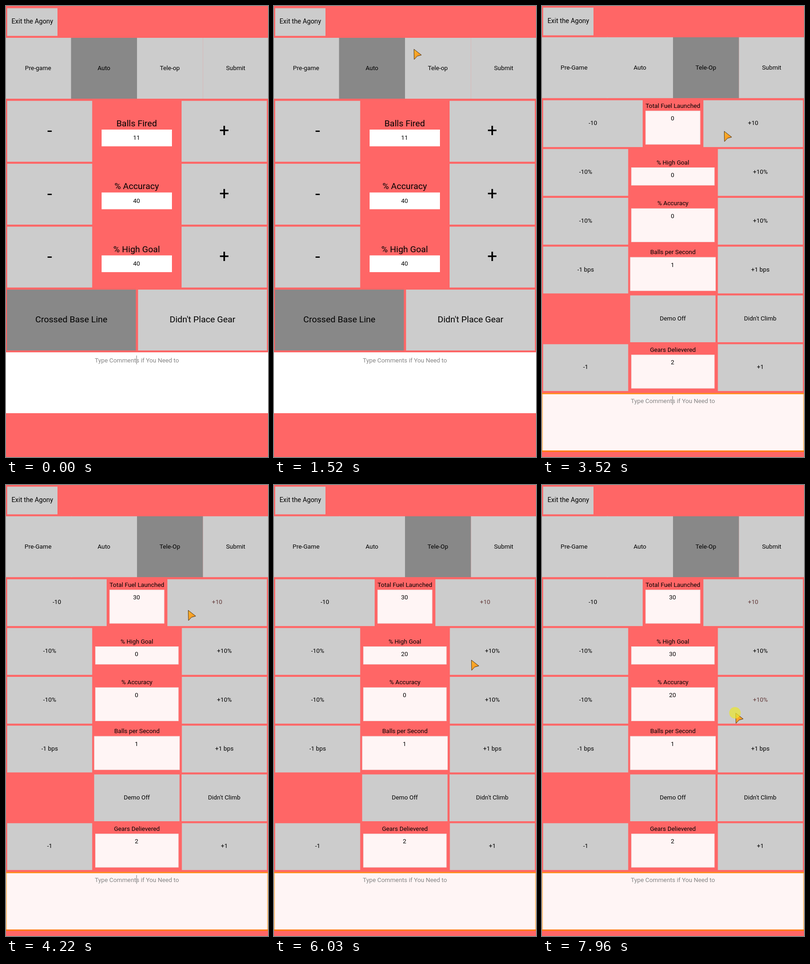
An HTML page for the animation above (7990 ms loop, 570 by 978 pixels).

```html
<!DOCTYPE html>
<html lang="en">
<head>
<meta charset="utf-8">
<title>Match form</title>
<style>
html, body { margin: 0; width: 100%; height: 100%; overflow: hidden; background: #ff6666; }
svg { display: block; width: 570px; height: 978px; font-family: Roboto, sans-serif; }
text { text-anchor: middle; white-space: pre; }
</style>
</head>
<body>
<svg id="stage" viewBox="0 0 570 978"></svg>
<script>
const LOOP = 7990, SWITCH = 1960, FOCUS = 2090, ENTER = 450, TAB_CLICK = 1640;
const RED = '#ff6666', GREY = '#cccccc', DARK = '#888888', PRESSED = '#f18282', PALE = '#fff5f5';
const SMALL = 13.3, MEDIUM = 14.25, LARGE = 19, HUGE = 38;
const stage = document.getElementById('stage');

function add(parent, tag, attrs = {}) {
  const el = document.createElementNS('http://www.w3.org/2000/svg', tag);
  for (const key in attrs) el.setAttribute(key, attrs[key]);
  return parent.appendChild(el);
}
function box(parent, x, y, width, height, fill, more) {
  return add(parent, 'rect', { x, y, width, height, fill, ...more });
}
function label(parent, str, x, y, size = SMALL, fill = '#000') {
  const el = add(parent, 'text', { x, y, 'font-size': size, fill });
  el.textContent = str;
  return el;
}
function button(parent, str, x, y, w, h, size = SMALL, fill = GREY) {
  const rect = box(parent, x, y, w, h, fill);
  const text = label(parent, str, x + w / 2, y + h / 2 + size * 0.342 - 1.2, size);
  return { rect, text };
}
function header(parent, top, names, active) {
  button(parent, 'Exit the Agony', 2.5, top - 64.2, 109.5, 60, MEDIUM);
  return names.map((name, i) => {
    const x = i && i * 143.5 - 2;
    const rect = box(parent, x, top, 143.6, 132, i === active ? DARK : GREY);
    label(parent, name, 69.8 + i * 143.3, top + 69.8);
    return rect;
  });
}
function input(parent, half, y, h, value) {
  const x = 284.8 - half;
  box(parent, x, y, 2 * half, h, PALE);
  box(parent, x + 0.5, y + 0.5, 2 * half - 1, h - 1, 'none', { stroke: '#efdede' });
  return label(parent, value, 284, y + 20.8);
}
function comments(parent, baseline) {
  label(parent, 'Type Comments if You Need to', 284.8, baseline, SMALL, '#858585');
  return box(parent, 283.4, baseline - 15, 1.4, 19, '#999');
}

box(stage, 0, 0, 570, 978, RED);

// Auto screen
const auto = add(stage, 'g');
const teleTab = header(auto, 69, ['Pre-game', 'Auto', 'Tele-op', 'Submit'], 1)[2];
[['Balls Fired', 11], ['% Accuracy', 40], ['% High Goal', 40]].forEach(([name, value], i) => {
  const y = 205.7 + i * 136.4;
  button(auto, '-', 2.5, y, 185, 132, HUGE);
  button(auto, '+', 382, y, 185.5, 132, HUGE);
  label(auto, name, 284.3, y + 55, LARGE);
  box(auto, 208, y + 62.3, 153, 36.3, '#fff');
  label(auto, value, 284, y + 84.5);
});
button(auto, 'Crossed Base Line', 2, 615, 280.5, 132, LARGE, DARK);
button(auto, "Didn't Place Gear", 287.3, 615, 280.4, 132, LARGE);
box(auto, 0, 751, 570, 132, '#fff');
const autoCaret = comments(auto, 773);

// Tele-op screen: rows sit in equal slots; start and gap time the three presses of "+"
const tele = add(stage, 'g');
header(tele, 67.8, ['Pre-Game', 'Auto', 'Tele-Op', 'Submit'], 2);
const slotY = slot => 204.4 + slot * 105.8;
const rows = [
  { name: 'Total Fuel Launched', step: '10', value: 0, slot: 0, side: 216.5, half: 59.5, start: 3380, gap: 190, tint: true },
  { name: '% High Goal', step: '10%', value: 0, slot: 1, high: 39, start: 5400, gap: 245 },
  { name: '% Accuracy', step: '10%', value: 0, slot: 2, start: 7420, gap: 255, tint: true },
  { name: 'Balls per Second', step: '1 bps', value: 1, slot: 3, half: 93 },
  { name: 'Gears Delievered', step: '1', value: 2, slot: 5 }
];
for (const row of rows) {
  const { side = 185, half = 90.5, high = 73 } = row;
  const y = slotY(row.slot), top = y + 59.4 - high / 2;
  button(tele, '-' + row.step, 2.5, y, side, 101.5);
  row.plus = button(tele, '+' + row.step, 567.6 - side, y, side, 101.5);
  label(tele, row.name, 284.8, top - 6.5);
  row.field = input(tele, half, top, high, row.value);
  row.clicks = row.start ? [0, 1, 2].map(i => row.start + i * row.gap) : [];
}
button(tele, 'Demo Off', 191.8, slotY(4), 185.7, 101.5);
button(tele, "Didn't Climb", 382, slotY(4), 185.6, 101.5);
box(tele, 0, 840, 570, 126, PALE);
const glow = add(tele, 'g');
box(glow, 1, 841, 568, 124, 'none', { stroke: '#ffb45a', 'stroke-width': 2, opacity: 0.75 });
box(glow, 0, 839, 570, 2.6, '#ff8a1e');
box(glow, 0, 963.8, 570, 3.2, '#ff7a14');
const teleCaret = comments(tele, 861);

// Pointer with click halo
const grad = add(add(stage, 'defs'), 'linearGradient', { id: 'amber', x1: 0, y1: 0, x2: 1, y2: 1 });
add(grad, 'stop', { offset: 0, 'stop-color': '#ffb62e' });
add(grad, 'stop', { offset: 1, 'stop-color': '#f28a1c' });
const pointer = add(stage, 'g');
add(pointer, 'path', {
  d: 'M.5 .7L16.7 13.3L7.6 15.8L1 23Z', fill: 'url(#amber)',
  stroke: '#4a3418', 'stroke-linejoin': 'round'
});
const halo = add(pointer, 'circle', { cx: -1.2, cy: 0, r: 12.5, fill: '#e9e431', opacity: 0.72 });

// Pointer moves: start, end, target x, target y
const moves = [
  [ENTER, 1230, 318, 195], [1230, 1520, 304, 93], [1520, TAB_CLICK, 325, 122],
  [FOCUS, 2520, 280, 177], [2520, 3200, 396, 271], [4700, 5390, 437, 374],
  [5640, 5900, 429, 379], [6240, 7080, 416, 501], [7420, 7660, 421, 494]
];
const clicks = [TAB_CLICK, ...rows.flatMap(row => row.clicks)];

const ease = k => (1 - Math.cos(Math.PI * k)) / 2;
const within = (t, start, length) => t >= start && t < start + length;
const show = (el, on) => el.setAttribute('visibility', on ? 'inherit' : 'hidden');
const isPressed = (t, times) => times.some(start => within(t, start + 60, 70));
const press = (rect, on) => rect.setAttribute('fill', on ? PRESSED : GREY);

function pointerAt(t) {
  let x = 505, y = 975;
  for (const [start, end, toX, toY] of moves) {
    const k = ease(Math.min(1, Math.max(0, (t - start) / (end - start))));
    x += (toX - x) * k;
    y += (toY - y) * k;
  }
  return [x, y];
}

function draw(t) {
  const blink = Math.floor((t + 280) / 500) % 2;
  show(auto, t < SWITCH);
  show(tele, t >= SWITCH);
  show(glow, t >= FOCUS);
  show(autoCaret, !blink);
  show(teleCaret, blink && t >= FOCUS);

  press(teleTab, isPressed(t, [TAB_CLICK]));
  for (const row of rows.filter(r => r.start)) {
    const value = 10 * row.clicks.filter(start => t >= start + 170).length;
    row.field.textContent = value;
    press(row.plus.rect, isPressed(t, row.clicks));
    row.plus.text.setAttribute('fill', row.tint && value >= 20 ? '#633a3a' : '#000');
  }

  show(pointer, t >= ENTER);
  show(halo, clicks.some(start => within(t, start, 110)));
  pointer.setAttribute('transform', `translate(${pointerAt(t)})`);
}

const begin = performance.now();
function tick() {
  draw((performance.now() - begin) % LOOP);
  requestAnimationFrame(tick);
}
draw(0);
requestAnimationFrame(tick);
</script>
</body>
</html>
```
